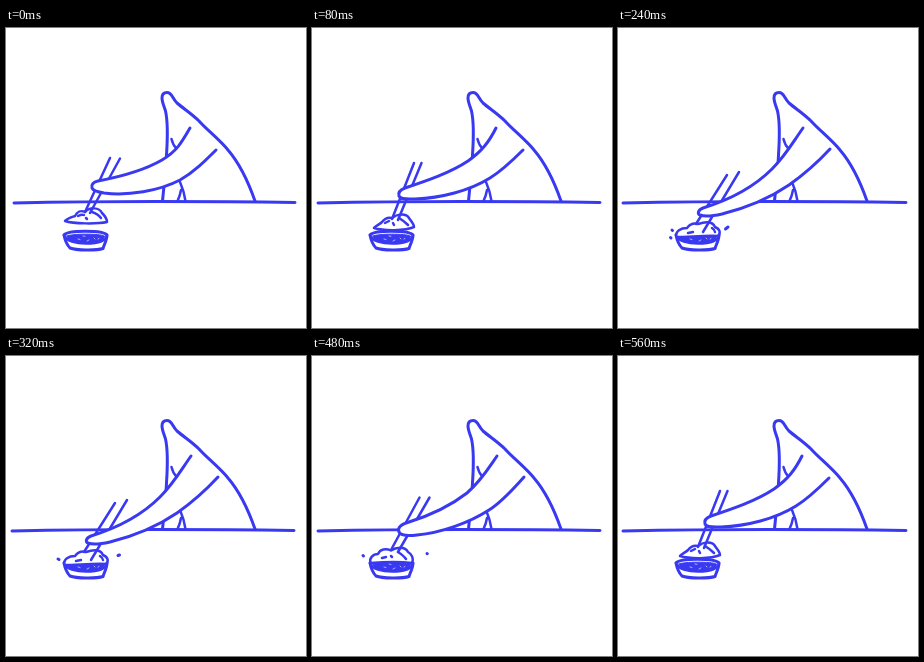
An HTML page for the animation above (640 ms loop, 300x300 px).

```html
<!DOCTYPE html>
<html lang="en">
<head>
<meta charset="utf-8">
<title>Dipping a dumpling</title>
<style>
  html, body { margin: 0; width: 100%; height: 100%; overflow: hidden; background: #fff; }
  svg { display: block; width: 100vw; height: 100vh; }
  path { fill: none; stroke: #3939f2; stroke-width: 3; stroke-linecap: round; stroke-linejoin: round; }
  .paper { fill: #fff; }
  .thin { stroke-width: 2.5; }
  .ink { fill: #3939f2; stroke-width: 1; }
  .fleck { stroke: #fff; stroke-width: .6; }
</style>
</head>
<body>
<svg id="stage" viewBox="0 0 300 300"></svg>
<script>
const STEP = 80;
const stage = document.getElementById('stage');

const BODY = 'M156.500 173C158 158 160 140 160.500 127C161.500 112 162 94 159.500 83C158 78 156 74 156 70C156 66 158 64.500 161 64.500C166 64.500 166 70 171 75C178 81 186 86 193 93C201 102 213 111 222 122C234 136 242 153 249 173';
const FOLDS = 'M165.500 111Q167 117 170 120M174 154Q178 163 179.500 173M175 162Q174 168 171.500 173';
const BOWL = 'M58 207C62 202 97 202 101 207C101 212 98 217 97 220.500C91 222.500 70 222.500 64 220C61 217 59 212 58 207Z';
const SAUCE = 'M61 208C65 205.500 94 205.500 98.500 208C98 214 89 215.500 80 215.500C70 215.500 62 213 61 208Z';
const RIM = 'M58 207C60 213 70 215.500 80 215.500C91 215.500 100 213 101 207';
const FLECKS = 'M72 211l2 .5M81 213l2-1M88 210l1 1M77 208l2 .3M92 211l1-.5';

const POSES = {
  high: {
    arm: 'M184 100C176 114 171 123 156 132C137 143 113 149 92 153C87 154 85 157 86 160C87 163 92 164 98 165C122 168 153 163 174 152C188 144 199 133 210 122',
    sticks: 'M104 130L79 184M114 130.500L84 185',
    food: 'M59 193C62 190 66 189 69 188C71 184 75 182 79 184C84 179 93 179 96 185C99 188 101 191 101 194C92 196 67 196 59 193Z',
    creases: 'M80 190l1 1M86 184Q92 186 95 190M72 188Q76 186 78 187'
  },
  mid: {
    arm: 'M184 100C177 114 170 123 156 133C138 145 114 153 93 160C88 162 86 165 87 168C89 172 96 171 103 171C129 170 157 163 178 150C191 142 201 132 211 122',
    sticks: 'M102 135L80 191M109.500 135L86 192',
    food: 'M62 200C65 197 68 196 70 194C73 190 76 189 80 190C85 186 94 185 97 190C99 193 102 196 102 199C93 203 72 203 62 200Z',
    creases: 'M81 195l1 2M87 190Q92 193 96 197M73 195l4-2'
  },
  low: {
    arm: 'M185 100C176 113 169 125 155 137C137 151 116 160 97 166C89 168 85 172 87 176C89 180 97 180 105 179C128 177 157 167 177 154C191 145 201 133 212 121',
    sticks: 'M107.500 141.500L79 194M117.500 141.500L86 196',
    food: 'M58.500 207C57 202 61 198 66 198C68 193 74 192 79 194.500C84 191 93 190 96 196C100 198 102 203 100 207C89 205.500 70 206 58.500 207Z',
    creases: 'M79 200l1 1M86 196Q92 200 94 203M70 202l4-1'
  },
  deep: {
    arm: 'M185 100C175 114 168 127 154 141C135 160 111 172 85 180C80 182 79 186 82 187C87 189 95 188 104 186C128 180 152 170 171 157C188 145 200 134 212 121',
    sticks: 'M109 147L78 196M121 144L85 204',
    food: 'M58.500 209C57 203 63 200 69 200C72 196 76 195 80 196C86 194 94 192 97 199C102 201 103 205 100 208C91 207 70 209 58.500 209Z',
    creases: 'M94 200Q97 202 97 204M70 205l5-1'
  }
};

// pose, table ends, splash drops
const STEPS = [
  ['high', [8, 289]],
  ['mid', [6, 288]],
  ['low', [5, 288]],
  ['deep', [5, 288], 'M54 202l.5.5M52.500 209.500l.5.5M107.500 201l2.500-2'],
  ['deep', [6, 288], 'M52 203l1 .5M112 199.500l1.500-.5'],
  ['deep', [7, 289], 'M51 200.500l1 1M114.500 197.500l.5.500'],
  ['low', [6, 288], 'M51 199.500l.5.500M115 197.500l.3.200'],
  ['mid', [5, 288]]
];

const line = (d, look = '') => `<path class="${look}" d="${d}"/>`;

function drawing([name, [left, right], drops]) {
  const pose = POSES[name];
  const table = `M${left} 175Q75 173.500 150 173.500T${right} 174.500`;
  return line(table) + line(BODY) + line(FOLDS, 'thin')
    + line(BOWL, 'paper') + line(SAUCE, 'ink') + line(RIM, 'thin') + line(FLECKS, 'fleck')
    + line(pose.food, 'paper thin') + line(pose.creases, 'thin')
    + line(pose.sticks, 'thin') + line(pose.arm, 'paper')
    + (drops ? line(drops) : '');
}

STEPS.forEach((step, i) => {
  const group = document.createElementNS('http://www.w3.org/2000/svg', 'g');
  group.innerHTML = drawing(step);
  stage.append(group);
  const share = 1 / STEPS.length;
  const duration = STEPS.length * STEP;
  group.animate([
    { opacity: 1, offset: 0 },
    { opacity: 1, offset: share },
    { opacity: 0, offset: share },
    { opacity: 0, offset: 1 }
  ], { duration, delay: i * STEP - duration, iterations: Infinity });
});
</script>
</body>
</html>
```
